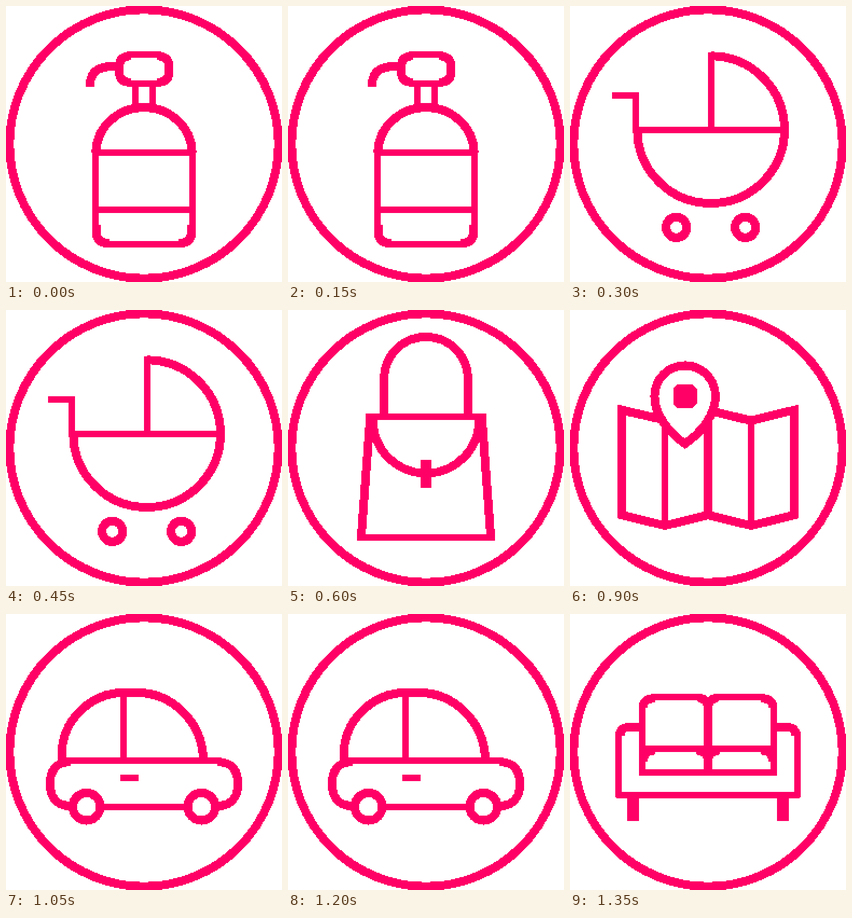
An HTML page with a canvas that plays this animation: 512x512 px, repeating every 1500 ms.

```html
<!DOCTYPE html>
<html lang="en">
<head>
<meta charset="utf-8">
<title>Line icons</title>
<style>
  html, body { margin: 0; width: 100%; height: 100%; overflow: hidden; background: #fff; }
  canvas { display: block; width: 100vmin; height: 100vmin; image-rendering: pixelated; }
</style>
</head>
<body>
<canvas id="stage" width="256" height="256"></canvas>
<script>
const SLOT = 150;
const COLOR = '#ff0066';
const UNITS = 96;
const THIN = 2.15, THICK = 2.95;

const canvas = document.getElementById('stage');
const ctx = canvas.getContext('2d', { willReadFrequently: true });

const circle = (x, y, r) => `M${x - r} ${y}a${r} ${r} 0 1 1 ${2 * r} 0a${r} ${r} 0 1 1 ${-2 * r} 0z`;
const box = (x, y, w, h) => `M${x} ${y}h${w}v${h}h${-w}z`;

const icons = {
  bottle: {
    thin: 'M31 50V79M65 50V79M35 83H61M30 51H66M30 71H66M45 27V35M51 27V35M42 17H54M42 27H54M39 21H35',
    thick: 'M31.3 51A16.7 15.7 0 0 1 64.7 51' +
      'M31.4 76V78.6Q31.4 82.6 36 82.6M64.6 76V78.6Q64.6 82.6 60 82.6' +
      'M43.5 17.4Q39.4 17.4 39.4 21V23Q39.4 26.6 43.5 26.6' +
      'M52.5 17.4Q56.7 17.4 56.7 21V23Q56.7 26.6 52.5 26.6' +
      'M38 21.1H35.5Q29.2 21.6 29.2 28'
  },
  stroller: {
    thin: 'M14.6 31H23V44M22 43H75M49 43V16',
    thick: 'M49 17.4A25.6 25.6 0 0 1 74.6 43A25.6 25.6 0 0 1 23.4 43' +
      circle(37, 77, 3.6) + circle(61, 77, 3.6)
  },
  handbag: {
    thin: 'M27.2 37H68.8M24 79H72',
    thick: 'M33.4 37V23.9A14.6 14.6 0 0 1 62.6 23.9V37' +
      'M28.6 37L25.4 80M67.4 37L70.6 80' +
      'M29.6 37V38.4A18.4 18.4 0 0 0 66.4 38.4V37',
    fill: box(46, 52, 4, 10)
  },
  ball: {
    thick: circle(48, 48, 26.8) + 'M48 21V75M21 48H75' +
      'M29 29.2C39.2 39.5 39.2 56.5 29 66.8M67 29.2C56.8 39.5 56.8 56.5 67 66.8'
  },
  map: {
    thin: 'M33 39V75M63 38V75',
    thick: 'M31.5 37.9L18 34.8V71.3L33 75L48 71.3L63 75L78 71.3V34.8L63 38.5L50.5 35.5M48 38V71.3' +
      'M40 46.5C35 43.2 29.4 36.8 29.4 30A10.6 10.7 0 0 1 50.6 30C50.6 36.8 45 43.2 40 46.5z',
    fill: 'M37.5 25.8h5l1.6 1.6v5.2l-1.6 1.6h-5l-1.6-1.6v-5.2z'
  },
  car: {
    thin: 'M20 51H75M41 28V51M33 67H63',
    thick: 'M19.4 51V49A22.2 21.7 0 0 1 41.6 27.3H45A23.6 23.7 0 0 1 68.6 51' +
      'M22.5 51.4C17 51.4 15.3 55 15.3 59C15.3 64 18 66.8 22.5 66.8' +
      'M73.5 51.4C79 51.4 80.7 55 80.7 59C80.7 64 78 66.8 73.5 66.8' +
      circle(28, 67, 4.8) + circle(68, 67, 4.8),
    fill: box(39.9, 55.8, 6.3, 2.4)
  },
  sofa: {
    thin: 'M25 31V55H71V31M28 29H45M51 29H68M25 47H71M17 41V63H79V41M20 39H25M71 39H76',
    thick: 'M48 31V55' +
      'M25.4 32.5Q25.4 29.4 29.5 29.4M70.6 32.5Q70.6 29.4 66.5 29.4' +
      'M44.5 29.2Q48 29.2 48 33Q48 29.2 51.5 29.2' +
      'M25.4 51.5Q25.4 47.4 29.5 47.4M70.6 51.5Q70.6 47.4 66.5 47.4' +
      'M44 47.4Q48 47.4 48 51.5Q48 47.4 52 47.4' +
      'M17.4 42.5Q17.4 39.4 20.5 39.4H24M78.6 42.5Q78.6 39.4 75.5 39.4H72',
    fill: box(20, 63, 4, 9) + box(72, 63, 4, 9)
  }
};

const sequence = ['bottle', 'bottle', 'stroller', 'stroller', 'handbag',
  'ball', 'map', 'car', 'car', 'sofa'];

function stroke(d, width) {
  if (!d) return;
  ctx.lineWidth = width;
  ctx.stroke(new Path2D(d));
}

// Turns soft edges into hard ones, for the stepped outline.
function harden() {
  const image = ctx.getImageData(0, 0, canvas.width, canvas.height);
  for (let i = 3; i < image.data.length; i += 4) {
    image.data[i] = image.data[i] > 110 ? 255 : 0;
    if (image.data[i]) image.data.set([255, 0, 102], i - 3);
  }
  ctx.putImageData(image, 0, 0);
}

function draw({ thin, thick, fill }) {
  const scale = canvas.width / UNITS;
  ctx.setTransform(1, 0, 0, 1, 0, 0);
  ctx.clearRect(0, 0, canvas.width, canvas.height);
  ctx.setTransform(scale, 0, 0, scale, 0, 0);
  ctx.strokeStyle = ctx.fillStyle = COLOR;
  stroke(circle(48, 48, 46.75), THICK);
  stroke(thin, THIN);
  stroke(thick, THICK);
  if (fill) ctx.fill(new Path2D(fill));
  harden();
}

let start, shown;
function tick(now) {
  start ??= now;
  const name = sequence[Math.floor((now - start) / SLOT) % sequence.length];
  if (name !== shown) draw(icons[shown = name]);
  requestAnimationFrame(tick);
}
draw(icons[shown = sequence[0]]);
requestAnimationFrame(tick);
</script>
</body>
</html>
```
